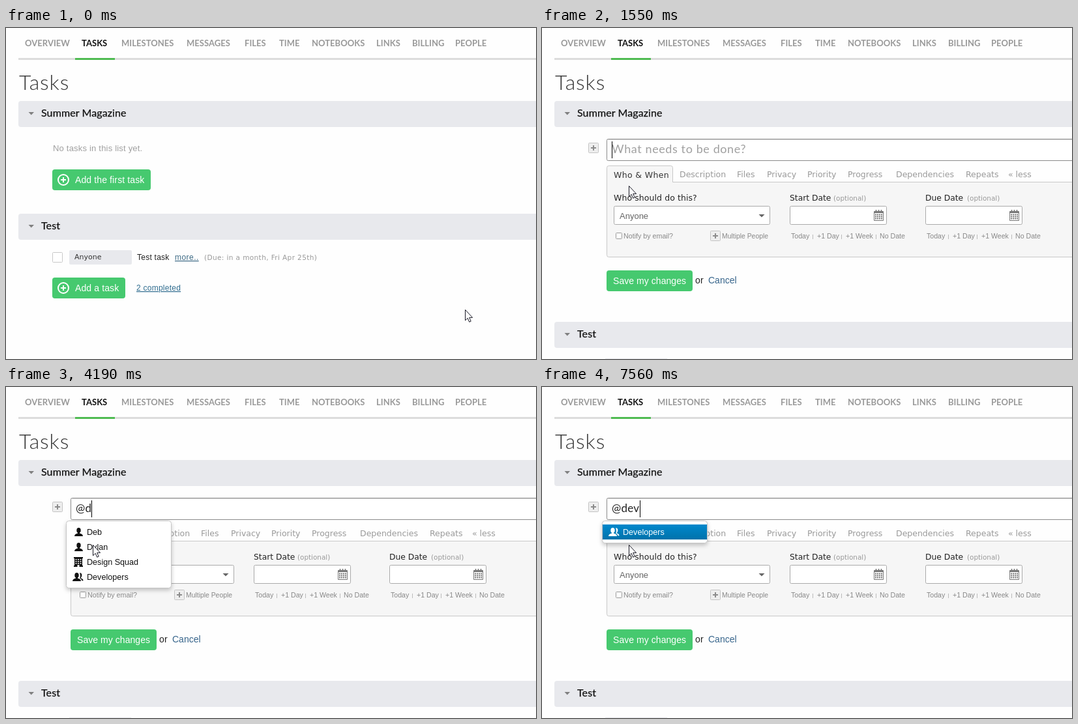
Animation, 813 px wide and 508 px high, one loop 8000 ms. Source, as an HTML page:

```html
<!DOCTYPE html>
<html lang="en">
<head>
<meta charset="utf-8">
<title>Tasks</title>
<style>
  html, body { margin: 0; width: 100%; height: 100%; overflow: hidden; background: #fefefe; }
  svg { display: block; width: 813px; height: 508px; }
  text { white-space: pre; }
  .lato { font-family: Lato, sans-serif; }
  .arial { font-family: "Liberation Sans", Arial, sans-serif; }
  .wide { font-family: "DejaVu Sans", Verdana, sans-serif; }
  .link { text-decoration: underline; }
  .pop { filter: drop-shadow(0 3px 3px rgba(0, 0, 0, .22)); }
</style>
</head>
<body>
<svg id="stage" viewBox="0 0 813 508">
  <defs>
    <linearGradient id="blue" x2="0" y2="1"><stop stop-color="#0088cc"/><stop offset="1" stop-color="#0072ab"/></linearGradient>
    <linearGradient id="press" x2="0" y2="1"><stop stop-color="#257a40" stop-opacity=".6"/><stop offset="1" stop-color="#257a40" stop-opacity="0"/></linearGradient>
    <g id="person">
      <ellipse cx="6.5" cy="4" rx="3.2" ry="4"/>
      <path d="M5 6H8V8.6Q12.6 9.6 13 13H0Q.4 9.6 5 8.6Z"/>
    </g>
    <g id="group">
      <path d="M9 .3Q12.6 .3 12.3 4.2Q12 6.6 11 7.4V8.4Q14.4 9.4 14.6 12.2H12.4Q12 9.6 9.2 8.5Q10.8 5 9 .3Z"/>
      <use href="#person" x="-2"/>
    </g>
    <g id="building">
      <path fill-rule="evenodd" d="M-1 -1H13V1H12V12H13V14H7.5V11H4.5V14H-1V12H0V1H-1Z"/>
      <path d="M2.5 2V10M6 2V10M9.5 2V10" stroke="#fff" stroke-width="2" stroke-dasharray="1.5 1.5"/>
    </g>
    <g id="calendar">
      <path d="M.5 2.5H14.5V16.5H.5Z" fill="#fff" stroke="#777"/>
      <path d="M1 3.5H14" stroke="#777" stroke-width="3"/>
      <path d="M3.5 0V4M7.5 0V4M11.5 0V4" stroke="#777" stroke-width="1.6"/>
      <path d="M2 7.5H13M2 10.5H13M2 13.5H13" stroke="#777" stroke-width="2" stroke-dasharray="2 1"/>
    </g>
  </defs>
  <g id="listPage"></g>
  <g id="formPage"></g>
  <g id="popup" class="pop"></g>
  <path id="arrow" d="M.5 .5V16.8L4.2 13.3L6.7 19.2L9.2 18.1L6.7 12.4H11.6Z" fill="#fff" stroke="#1a1a26"/>
  <path id="hand" d="M5.5 11V2Q5.5 .5 7 .5T8.5 2V7Q11 6.4 11.3 8Q13.6 7.3 14 9Q16.5 8.6 16.5 11V15Q16.5 17 15 19V22.5H6.5V20.5L1.2 13.5Q.2 11.6 1.5 10.8T4 11.5L5.5 13ZM8.5 7V11M11.3 8V11.5M14 9V12" fill="#fff" stroke="#222"/>
</svg>
<script>
const $ = id => document.getElementById(id);
const GREEN = '#46c96f', BAR = '#e8e9ed';

const text = (x, y, str, size, fill, font = 'arial', gap = 0, extra = '') =>
  `<text x="${x}" y="${y}" class="${font}" font-size="${size}" fill="${fill}" letter-spacing="${gap}" ${extra}>${str.replace(/&/g, '&amp;')}</text>`;

const box = (x, y, w, h, fill, r = 0, stroke = '') => stroke
  ? `<rect x="${x + .5}" y="${y + .5}" width="${w - 1}" height="${h - 1}" rx="${r}" fill="${fill}" stroke="${stroke}"/>`
  : `<rect x="${x}" y="${y}" width="${w}" height="${h}" rx="${r}" fill="${fill}"/>`;

const path = (d, stroke, width = 1, fill = 'none') =>
  `<path d="${d}" stroke="${stroke}" stroke-width="${width}" fill="${fill}"/>`;

const section = (y, title) => box(19, y, 810, 40, BAR, 4) +
  path(`M34.5 ${y + 17}H43L38.75 ${y + 21.5}Z`, 'none', 0, '#808080') +
  text(54, y + 24, title, 16, '#111', 'lato', .1, 'stroke="#111" stroke-width=".25"');

const addButton = (y, w, label) => box(71, y, w, 32, GREEN, 4) +
  `<circle cx="88" cy="${y + 16}" r="8" fill="none" stroke="#fff" stroke-width="2"/>` +
  path(`M84 ${y + 16}H92M88 ${y + 12}V${y + 20}`, '#fff', 2) +
  text(106, y + 21, label, 14, '#fff', 'arial', .12);

const plusBox = (x, y) => box(x, y, 16, 16, '#eee', 1, '#c4c4c4') +
  path(`M${x + 4} ${y + 8}H${x + 12}M${x + 8} ${y + 4}V${y + 12}`, '#8c8c8c', 2);

const dateField = (x, label, optX) =>
  text(x, 265, label, 12.3, '#222', 'wide') +
  text(optX, 265, '(optional)', 10.4, '#999', 'wide') +
  box(x, 273, 149, 29, '#fff', 2, '#aaa') +
  `<use href="#calendar" x="${x + 129}" y="279"/>` +
  [[2, 'Today'], [42, '+1 Day'], [86, '+1 Week'], [138, 'No Date']]
    .map(([dx, s]) => text(x + dx, 323, s, 10.6, '#888')).join('') +
  path([35, 79, 132].map(dx => `M${x + dx + .5} 317V324`).join(''), '#bbb');

const nav = [[29, 'OVERVIEW'], [116, 'TASKS'], [177, 'MILESTONES'], [277, 'MESSAGES'], [366, 'FILES'],
  [419, 'TIME'], [469, 'NOTEBOOKS'], [568, 'LINKS'], [623, 'BILLING'], [689, 'PEOPLE']];

const header = nav.map(([x, s]) => text(x, 28, s, 13, s === 'TASKS' ? '#111' : '#999', 'lato', .03, 'font-weight="700"')).join('') +
  box(19, 46, 794, 3, '#dcdcdc') + box(106, 46, 61, 3, '#4fbb52') +
  text(20, 95, 'Tasks', 32, '#333', 'lato', .9, 'font-weight="300"') +
  section(112, 'Summer Magazine');

$('listPage').innerHTML = header +
  text(72, 189, 'No tasks in this list yet.', 13, '#a0a0a0', 'arial', .2) +
  addButton(217, 151, 'Add the first task') +
  `<g id="pressed">${box(71, 217, 151, 32, 'rgba(40,120,65,.16)', 4)}${box(71, 217, 151, 5, 'url(#press)', 3)}</g>` +
  section(285, 'Test') +
  box(71, 344, 16, 16, '#fff', 1, '#c8c8c8') +
  box(97, 341, 96, 22, BAR, 2) +
  text(105, 355, 'Anyone', 11, '#333', 'wide') +
  text(201, 356, 'Test task', 12, '#222', 'arial', .25) +
  text(259, 356, 'more..', 12, '#3d6a85', 'arial link', .45) +
  text(304, 356, '(Due: in a month, Fri Apr 25th)', 10.5, '#999', 'wide', .39) +
  addButton(383, 112, 'Add a task') +
  text(200, 403, '2 completed', 12, '#2f6c8f', 'arial link', .25);

const tabs = [[211, 'Description'], [299, 'Files'], [345, 'Privacy'], [407, 'Priority'], [469, 'Progress'],
  [543, 'Dependencies'], [650, 'Repeats'], [715, '« less']];

$('formPage').innerHTML = header +
  plusBox(71, 176) +
  box(99, 170, 740, 34, '#fff', 2, '#8a8a8a') + path('M101 171.5H813', '#ddd') +
  '<g id="hint">' + text(107, 192, 'What needs to be done?', 18, '#a0a0a0', 'lato', .6) + '</g>' +
  '<text id="typed" class="lato" x="107" y="192" font-size="17" letter-spacing=".2" fill="#222"></text>' +
  box(0, 174, 1, 26, '#000').replace('<rect', '<rect id="caret"') +
  box(99, 236, 740, 116, '#f6f6f6', 3, '#c8c8c8') +
  path('M99.5 240V214.5Q99.5 211.5 102.5 211.5H197.5Q200.5 211.5 200.5 214.5V236.5', '#c8c8c8', 1, '#f6f6f6') +
  box(100, 235, 100, 6, '#f6f6f6') +
  text(110, 230, 'Who & When', 12.5, '#333', 'wide', .35) +
  tabs.map(([x, s]) => text(x, 229, s, 12.5, '#999', 'wide')).join('') +
  text(110, 265, 'Who should do this?', 12.5, '#222', 'wide', .08) +
  box(110, 273, 240, 29, '#fff', 2, '#aaa') +
  text(119, 293, 'Anyone', 13, '#666') +
  path('M332.5 286H341.5L337 290.5Z', 'none', 0, '#666') +
  box(113, 314, 10, 10, '#fff', 1, '#999') +
  text(125, 323, 'Notify by email?', 10.7, '#888') +
  plusBox(258, 311) + text(276, 323, 'Multiple People', 10.4, '#888') +
  dateField(380, 'Start Date', 447) + dateField(588, 'Due Date', 652) +
  box(99, 372, 132, 32, GREEN, 4) +
  text(109, 393, 'Save my changes', 14, '#fff', 'arial', .05) +
  text(235, 392, 'or', 14, '#222', 'arial', .2) + text(255, 392, 'Cancel', 14, '#36648b') +
  section(451, 'Test') +
  box(97, 507, 95, 1, BAR);

const people = ['Abel', 'Avril', 'Christina', 'Deb', 'Dylan', 'Guglielmo', 'Harry', 'Holly', 'Lauren',
  'Orlaith', 'Patrick', 'Pete', 'Vytenis'];
const icons = { 'Design Squad': ['building', 105], Developers: ['group', 104] };

function menu(items, active) {
  const ink = active ? '#fff' : '#111';
  const tall = items === people ? 420 : items.length * 23 + 10;
  return box(92, 205, 162, tall + 2, '#fff', 4, '#c6c6c6') +
    (active ? box(93, 211, 160, 23, 'url(#blue)') : '') +
    items.map((name, i) => {
      const [icon, x] = icons[name] || ['person', 105];
      return `<use href="#${icon}" x="${x}" y="${216 + i * 23}" fill="${ink}"/>` +
        text(124, 227 + i * 23, name, 12.6, ink);
    }).join('');
}

const menus = {
  '': '',
  '@': menu(people),
  '@d': menu(['Deb', 'Dylan', 'Design Squad', 'Developers']),
  '@de': menu(['Developers'], true)
};
menus['@dev'] = menus['@de'];

// Each table is a list of [start ms, ...values].
const LOOP = 8000, PRESS = 1390, OPEN = 1550;
const moves = [[0, 'arrow', 704, 432], [150, 'arrow', 713, 433], [280, 'arrow', 538, 389],
  [420, 'arrow', 290, 322], [540, 'arrow', 96, 277], [660, 'arrow', 153, 255], [810, 'hand', 138, 248],
  [960, 'hand', 131, 242], [1110, 'hand', 129, 242], [OPEN, 'arrow', 133, 242]];
const typing = [[0, '', 107], [3090, '@', 121], [4190, '@d', 131], [5390, '@de', 141], [6480, '@dev', 150]];
const blinks = [[0, 1], [2100, 0], [2660, 1], [3520, 0], [4050, 1], [4720, 0], [5270, 1], [5920, 0],
  [6350, 1], [7010, 0], [7560, 1]];

const at = (table, t) => table.findLast(row => row[0] <= t).slice(1);
const show = (id, on) => $(id).setAttribute('visibility', on ? 'inherit' : 'hidden');

let lastWord = null;
function draw(t) {
  const [cursor, x, y] = at(moves, t);
  const [word, caretX] = at(typing, t);
  show('listPage', t < OPEN);
  show('formPage', t >= OPEN);
  show('pressed', t >= PRESS && t < OPEN);
  for (const id of ['arrow', 'hand']) show(id, id === cursor);
  $(cursor).setAttribute('transform', `translate(${x} ${y})`);
  show('caret', t >= OPEN && at(blinks, t)[0]);
  $('caret').setAttribute('x', caretX);
  show('hint', t >= OPEN && !word);
  if (word !== lastWord) {
    $('typed').textContent = word;
    $('popup').innerHTML = menus[word];
    lastWord = word;
  }
}

const start = performance.now();
function tick() {
  draw((performance.now() - start) % LOOP);
  requestAnimationFrame(tick);
}
tick();
</script>
</body>
</html>
```
